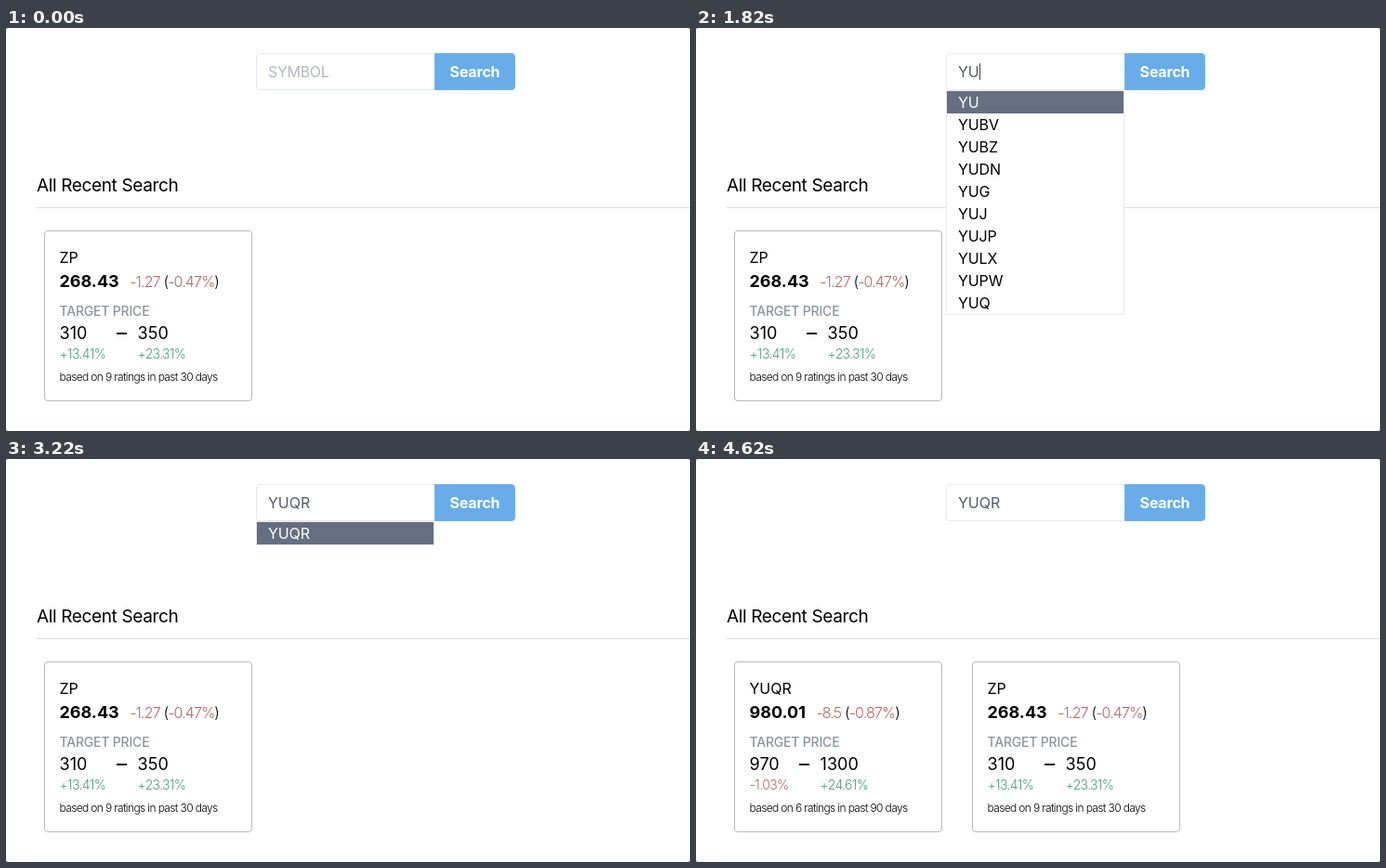
An HTML page for the animation above (4.69 s loop, 736 by 434 pixels).

```html
<!DOCTYPE html>
<html lang="en">
<head>
<meta charset="utf-8">
<title>Ticker search</title>
<style>
  * { box-sizing: border-box; }
  html, body { margin: 0; width: 736px; height: 434px; overflow: hidden; }
  html { background: #999; }
  body {
    position: relative; background: #fff; border-radius: 3px; color: #000;
    font: 16px/24px Inter, "Open Sans", sans-serif;
    font-optical-sizing: none; white-space: nowrap;
  }
  body > *, .card > * { position: absolute; }
  #field {
    left: 269px; top: 27px; width: 193px; height: 40px; padding-left: 12px;
    border: 1px solid #e5e8ed; border-radius: 4px 0 0 4px;
    line-height: 38px; color: #555b66;
  }
  #hint { position: absolute; left: 12px; color: #b5b8bd; letter-spacing: -.3px; }
  #caret {
    display: inline-block; width: 1px; height: 18px;
    background: #444; vertical-align: -3px;
  }
  #button {
    left: 461px; top: 27px; width: 87px; height: 40px;
    border: 1px solid #74b3ec; border-radius: 0 4px 4px 0; background: #68adea; color: #fff;
    font-weight: 700; line-height: 38px; text-align: center; letter-spacing: -.2px;
  }
  #list {
    left: 269px; top: 67px; width: 192px; z-index: 1;
    border: 1px solid #e5e8ed; background: #fff; letter-spacing: -.1px;
  }
  #list div { padding-left: 12px; }
  #list div:first-child { background: #666e81; color: #fff; }
  h1 { left: 33px; top: 158px; margin: 0; font-size: 19px; font-weight: 400; line-height: 24px; letter-spacing: -.36px; }
  #rule { left: 33px; top: 193px; width: 703px; height: 1px; background: #dcdddf; }
  .card {
    left: 41px; top: 218px; width: 224px; height: 184px;
    border: 1px solid #b6b8bc; border-radius: 4px;
  }
  .card > * { left: 15.5px; }
  .name { top: 16px; }
  .price { top: 42px; }
  .price b { font-size: 18px; margin-right: 11.5px; }
  .price span { font-weight: 300; letter-spacing: -.053em; }
  .label { top: 74px; font-size: 14px; font-weight: 500; color: #8d929e; letter-spacing: -.2px; }
  .goal { top: 98px; font-size: 18px; }
  .gain { top: 120px; font-size: 14px; font-weight: 300; letter-spacing: -.045em; }
  .dash { top: 109px; width: 11px; height: 1.5px; background: #111; }
  .note { top: 145px; font-size: 12px; font-weight: 300; letter-spacing: -.64px; }
  .up { color: #4b9b78; }
  .down { color: #b96464; }
</style>
</head>
<body>
<div id="field"><span id="hint">SYMBOL</span><span id="typed"></span><i id="caret"></i></div>
<div id="button">Search</div>
<div id="list"></div>
<h1>All Recent Search</h1>
<div id="rule"></div>
<script>
const $ = id => document.getElementById(id);
const tone = s => s[0] === '-' ? 'down' : 'up';

// gap: distance from the low target to the high target
function addCard({ name, price, change, percent, goals, gains, gap, note }) {
  const card = document.createElement('div');
  card.className = 'card';
  const column = i => {
    const at = `style="left:${15.6 + i * gap}px"`;
    return `<div class="goal" ${at}>${goals[i]}</div>
      <div class="gain ${tone(gains[i])}" ${at}>${gains[i]}</div>`;
  };
  card.innerHTML = `<div class="name">${name}</div>
    <div class="price"><b>${price}</b><span><span class="${tone(change)}">${change}</span>
      (<span class="${tone(percent)}">${percent}</span>)</span></div>
    <div class="label">TARGET PRICE</div>${column(0)}${column(1)}
    <div class="dash" style="left:${gap - 7}px"></div>
    <div class="note">based on ${note} days</div>`;
  document.body.append(card);
  return card;
}

const found = addCard({
  name: 'YUQR', price: '980.01', change: '-8.5', percent: '-0.87%',
  goals: [970, 1300], gains: ['-1.03%', '+24.61%'], gap: 76, note: '6 ratings in past 90'
});
const recent = addCard({
  name: 'ZP', price: '268.43', change: '-1.27', percent: '-0.47%',
  goals: [310, 350], gains: ['+13.41%', '+23.31%'], gap: 84, note: '9 ratings in past 30'
});

// start time, typed text, caret shown, suggestions
const steps = [
  [0, '', false, ''],
  [630, '', true, ''],
  [1120, '', false, ''],
  [1540, 'Y', true, 'YV YVV YVPK YVPKD YVQQ YVQH YVZ YVZE YVZM YVZT'],
  [1820, 'YU', true, 'YU YUBV YUBZ YUDN YUG YUJ YUJP YULX YUPW YUQ'],
  [2100, 'YUQ', true, 'YUQ YUQ-E YUQ-F YUQQ YUQR'],
  [2660, 'YUQR', true, 'YUQR'],
  [3150, 'YUQR', false, 'YUQR'],
  [3290, 'YUQR', false, ''],
  [3640, 'YUQR', true, ''],
  [4200, 'YUQR', false, '']
];
const LOOP = 4690, RESULT = 3290;
const show = (el, on) => el.style.visibility = on ? 'visible' : 'hidden';
const start = performance.now();
let current;

function draw() {
  const time = (performance.now() - start) % LOOP;
  const step = steps.findLast(s => s[0] <= time);
  if (step !== current) {
    current = step;
    const [at, text, caret, names] = step;
    const done = at >= RESULT;
    $('typed').textContent = text;
    show($('hint'), !text);
    show($('caret'), caret);
    show($('list'), names);
    $('list').innerHTML = names.split(' ').map(n => `<div>${n}</div>`).join('');
    show(found, done);
    recent.style.left = done ? '297px' : '41px';
  }
  requestAnimationFrame(draw);
}
draw();
</script>
</body>
</html>
```
